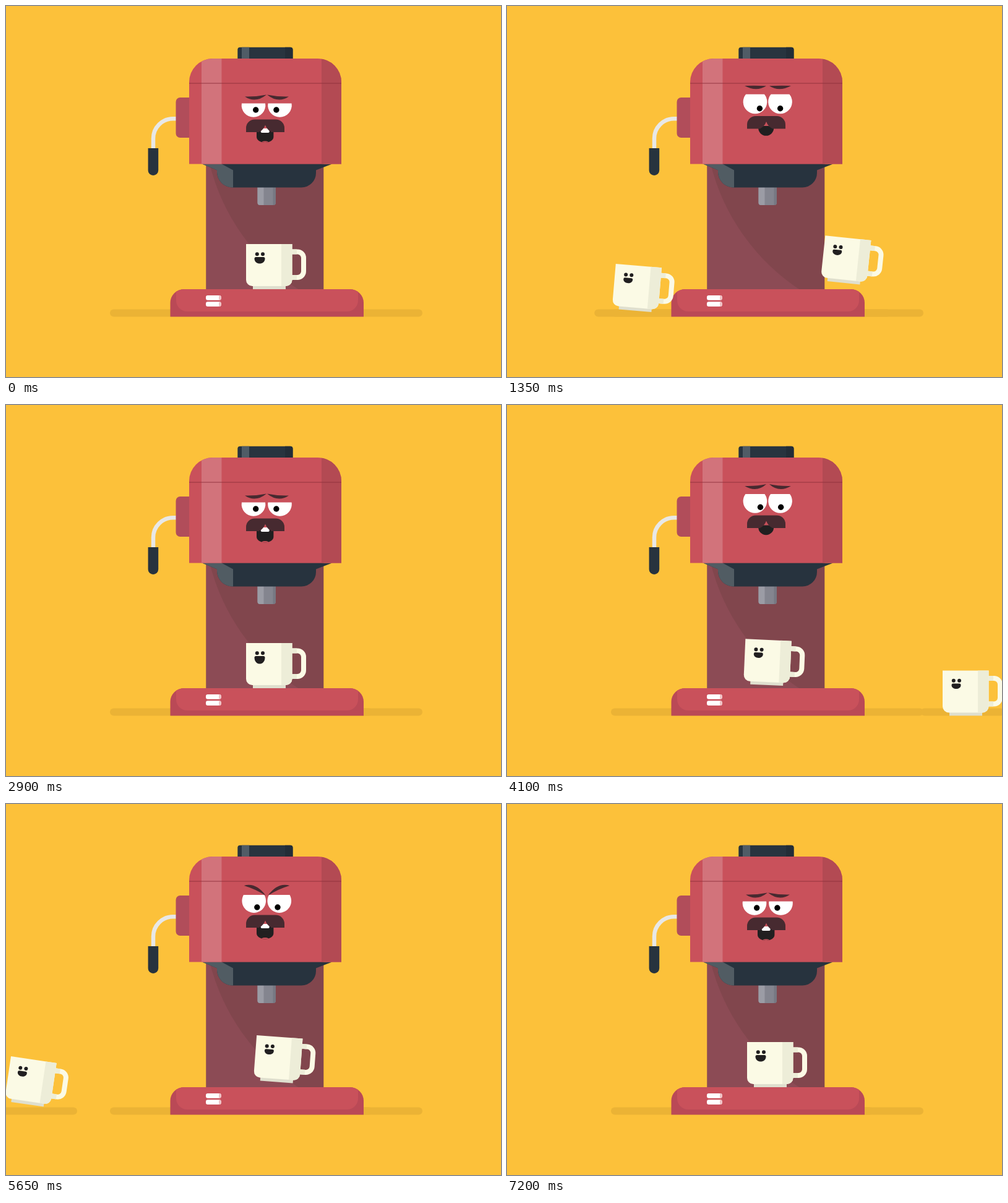
These frames come from a looping animation (800x600 px, 7.25 s). An HTML page:

```html
<!DOCTYPE html>
<html lang="en">
<head>
<meta charset="utf-8">
<title>Coffee machine</title>
<style>
html, body { margin: 0; width: 100%; height: 100%; overflow: hidden; background: #fcc13a; }
svg { display: block; width: 800px; height: 600px; }
.shadow { fill: #ebb335; }
.red { fill: #c9515b; }
.navy { fill: #27333e; }
.hair { fill: #472a30; }
.ink { fill: #211f20; }
.shade { fill: #ededd8; }
</style>
</head>
<body>
<svg viewBox="0 0 800 600">
  <defs>
    <clipPath id="headClip"><rect x="296" y="85" width="246" height="220" rx="38"/></clipPath>
    <clipPath id="baseClip"><rect x="265.5" y="458" width="312.5" height="90" rx="22"/></clipPath>
    <clipPath id="mouthClip"><path id="mouth"/></clipPath>
    <g id="cup">
      <path d="M74 12.500H83a10 10 0 0 1 10 10V44a10 10 0 0 1-10 10H74" fill="none" stroke="#fbfae5" stroke-width="8"/>
      <path class="shade" d="M74 8.500h8v8h-8ZM74 50h8v8h-8Z"/>
      <path d="M11 67H64V73H11Z" fill="#dfdfce"/>
      <path d="M0 0H74.500V58a10 10 0 0 1-10 10H10a10 10 0 0 1-10-10Z" fill="#fbfae5"/>
      <path class="shade" d="M57 0H74.500V58a10 10 0 0 1-10 10H57Z"/>
      <circle class="ink" cx="17.800" cy="16.200" r="3"/>
      <circle class="ink" cx="27" cy="16.200" r="3"/>
    </g>
    <g id="light">
      <rect x="323" y="468" width="24.700" height="7.700" rx="3" fill="#fff"/>
      <path d="M344 468h.7a3 3 0 0 1 3 3v1.700a3 3 0 0 1-3 3h-.7Z" fill="#f0c3c6"/>
    </g>
  </defs>

  <rect class="shadow" x="168" y="490.5" width="505" height="12" rx="6"/>
  <rect class="shadow" id="shadowA" y="490.5" width="135" height="12" rx="6"/>
  <rect class="shadow" id="shadowB" y="490.5" width="135" height="12" rx="6"/>

  <!-- column -->
  <path d="M323.500 250H513.300V460H323.500Z" fill="#81464d"/>
  <path d="M323.500 255H329A344 344 0 0 0 475 460H323.500Z" fill="#8c4b55"/>

  <!-- spout and funnel -->
  <rect x="406.500" y="280" width="29.500" height="42" rx="4" fill="#84858f"/>
  <path d="M406.500 290H416.500V322H410.500a4 4 0 0 1-4-4Z" fill="#9b9ca5"/>
  <path d="M431.500 290H436V318a4 4 0 0 1-4 4h-.5Z" fill="#777882"/>
  <path class="navy" d="M317 255.500H527L501 265.500V270a23.500 23.500 0 0 1-23.500 23.500H366a25 25 0 0 1-25-25V265.500Z"/>
  <path d="M317 255.500H348.500L367 265.500V293.500H366a25 25 0 0 1-25-25V265.500Z" fill="#515c63"/>

  <!-- steam wand -->
  <path d="M276 182.300H270A32 32 0 0 0 238 214.300V234" fill="none" stroke="#e8e8e6" stroke-width="6.500"/>
  <path class="navy" id="grip" d="M229.600 230H246.200V265.700a8.300 8.300 0 0 1-16.600 0Z"/>
  <path d="M296 148H281.500a7 7 0 0 0-7 7V206a7 7 0 0 0 7 7H296Z" fill="#b14d5a"/>

  <!-- head -->
  <rect x="374.300" y="66.700" width="89.200" height="24" rx="4" fill="#28343f"/>
  <path d="M381 66.700H393V86H381Z" fill="#505c66"/>
  <path d="M451 66.700H459.500a4 4 0 0 1 4 4V86H451Z" fill="#232d37"/>
  <g clip-path="url(#headClip)">
    <path class="red" d="M296 85H542V255.500H296Z"/>
    <path d="M316 85H348.500V255.500H316Z" fill="#d2737b"/>
    <path d="M510 85H542V255.500H510Z" fill="#b34a53"/>
    <path d="M296 124H542V126H296Z" fill="#8c2f3a" opacity=".45"/>
  </g>

  <!-- base -->
  <g clip-path="url(#baseClip)">
    <path d="M265 458H578V502.500H265Z" fill="#ba4956"/>
    <rect class="red" x="275" y="430" width="294" height="64" rx="18"/>
  </g>
  <use href="#light"/>
  <use href="#light" y="10.300"/>

  <!-- face -->
  <path class="hair" id="brow"/>
  <use href="#brow" transform="translate(843 0) scale(-1 1)"/>
  <path id="eye" fill="#fff"/>
  <use href="#eye" transform="translate(842.5 0) scale(-1 1)"/>
  <g id="pupils"><circle r="4.700"/><circle cx="33.200" r="4.700"/></g>
  <g clip-path="url(#mouthClip)">
    <path class="ink" d="M395 180H445V240H395Z"/>
    <rect id="teeth" fill="#fff" rx="2"/>
    <ellipse class="red" id="tongue" cx="418.700" rx="8" ry="5"/>
  </g>
  <path class="hair" id="moustache" d="M388 20.500V14a14 14 0 0 1 14-14H436a14 14 0 0 1 14 14V20.500H429Q422 17 419 9Q416 17 409 20.500Z"/>

  <g id="cupA"><use href="#cup"/><path class="ink"/></g>
  <g id="cupB"><use href="#cup"/><path class="ink"/></g>
</svg>
<script>
const LOOP = 7250, ROUND = 3550, STEP = 50, BEAT = 300;
const TRAY = 385, FLOOR = 429.5;
const el = id => document.getElementById(id);
const lerp = (a, b, p) => a + (b - a) * p;
const ramp = (t, from, to) => Math.max(0, Math.min(1, (t - from) / (to - from)));
const smooth = (t, from, to) => {
  const p = ramp(t, from, to);
  return p * p * (3 - 2 * p);
};

// A cup at time t; each hop moves it left, rising and leaning with its length.
class Cup {
  constructor(name, t, x, y) { Object.assign(this, { name, t, x, y, tilt: 0 }); }

  hop(start, end, dist, level = this.y) {
    const p = ramp(this.t, start, end), arc = Math.sin(Math.PI * p);
    this.x -= dist * p;
    this.y = lerp(this.y, level, p * p) - 0.28 * dist * arc;
    this.tilt += Math.min(12, 0.14 * dist) * arc;
    return this;
  }

  draw(smile, shadowX) {
    const g = el("cup" + this.name), w = 7.5 + ramp(smile, 10, 12.5), low = 21 + smile * 1.06;
    g.setAttribute("transform", `translate(${this.x} ${this.y}) rotate(${this.tilt} 37.5 73)`);
    g.lastElementChild.setAttribute("d",
      `M${24.5 - w} 21H${19.5 + w}q2.5 0 2.5 2.5C${22 + w} ${low} ${22 - w} ${low} ${22 - w} 23.5q0-2.5 2.5-2.5Z`);
    el("shadow" + this.name).setAttribute("x", shadowX - 67.5);
  }
}

function drawCups(t, chat) {
  const a = new Cup("A", t, 388, TRAY).hop(515, 800, 48).hop(800, 1300, 159, FLOOR);
  for (let s = 1300; s < 2800; s += BEAT) a.hop(s, s + BEAT, 69);
  a.draw(12.5 - 2.5 * ramp(t, 0, 450), 90.5 + (1900 - t) * 0.215);

  const b = new Cup("B", t, 832, FLOOR).hop(0, 250, 73);
  for (let s = 250; s < 850; s += BEAT) b.hop(s, s + BEAT, 55);
  b.hop(850, 1450, 171, TRAY).hop(1600, 1900, 55).hop(1900, 2200, 35);
  // its shadow glides in, slows near the machine, then slips behind it
  const glide = 870 - 134 * ramp(t, 0, 550) - 42 * ramp(t, 550, 850) - 169 * ramp(t, 850, 1450);
  b.draw(10 + 2.5 * ramp(t, 2200, 2450) + 2.5 * chat * ramp(t, 2400, 2500), glide);
}

function drawFace(t, chat) {
  const lift = ramp(t, 0, 600) * (1 - smooth(t, 1850, 2550));
  const anger = smooth(t, 1150, 1900) * (1 - smooth(t, 2150, 2550));

  const bx = 386 - 2 * lift, by = lerp(146.5, 129.5, lift) - 3.5 * anger * lift;
  const drop = lerp(-3, 16, anger), bend = by + drop / 2 + lerp(2, -13.5, anger);
  el("brow").setAttribute("d", `M${bx} ${by}Q404 ${bend} ${bx + 35} ${by + drop}Q403 ${bend + 11} ${bx} ${by}Z`);

  const r = 19.3, cx = 400 + lift, cy = lerp(160.5, 155, lift), lid = lerp(157.5, 142.7, lift);
  const w = Math.sqrt(r * r - (lid - cy) ** 2);
  el("eye").setAttribute("d", `M${cx - w} ${lid}A${r} ${r} 0 1 0 ${cx + w} ${lid}Z`);

  const look = ramp(t, 0, 600) * (1 - ramp(t, 900, 2700));
  el("pupils").setAttribute("transform", `translate(${403.7 + 6.3 * look} ${168 - 3 * look})`);

  const top = lerp(183.5, 178, lift);
  el("moustache").setAttribute("transform", `translate(0 ${top})`);
  drawMouth(top, 37.5 - 5.7 * ramp(t, 0, 500) * (1 - ramp(t, 1600, 2100)) + 1.5 * chat);
}

function drawMouth(top, open) {
  const bite = ramp(open, 33, 37), mid = 418.7, half = 12.5 + bite * 1.2;
  const rim = top + lerp(16, 14.5, bite), round = lerp(12.5, 9.5, bite), low = top + open;
  el("mouth").setAttribute("d",
    `M${mid - half} ${rim + 3}L${mid - 4} ${rim}h8L${mid + half} ${rim + 3}` +
    `V${low - round}a${half} ${round} 0 0 1 ${-2 * half} 0Z`);
  const teeth = { x: mid - 7 * bite, y: rim - 1, width: 14 * bite, height: 8 * bite };
  for (const k in teeth) el("teeth").setAttribute(k, teeth[k]);
  el("tongue").setAttribute("cy", low + 6 - 3.5 * bite);
}

function draw(now) {
  const time = Math.floor(now % LOOP / STEP) * STEP;
  const t = time < ROUND ? time : time - ROUND;
  const chat = Math.sin((t - 2000) * Math.PI / 200) * ramp(t, 1600, 2000) * (1 - ramp(t, 3550, 3650));
  drawCups(t, chat);
  drawFace(t, chat);
  const jolt = ramp(t, 1700, 1900) - ramp(t, 1900, 2080);
  el("grip").setAttribute("transform", `translate(0 ${-7 * jolt})`);
}

let begin;
function tick(now) {
  begin ??= now;
  draw(now - begin);
  requestAnimationFrame(tick);
}
draw(0);
requestAnimationFrame(tick);
</script>
</body>
</html>
```
